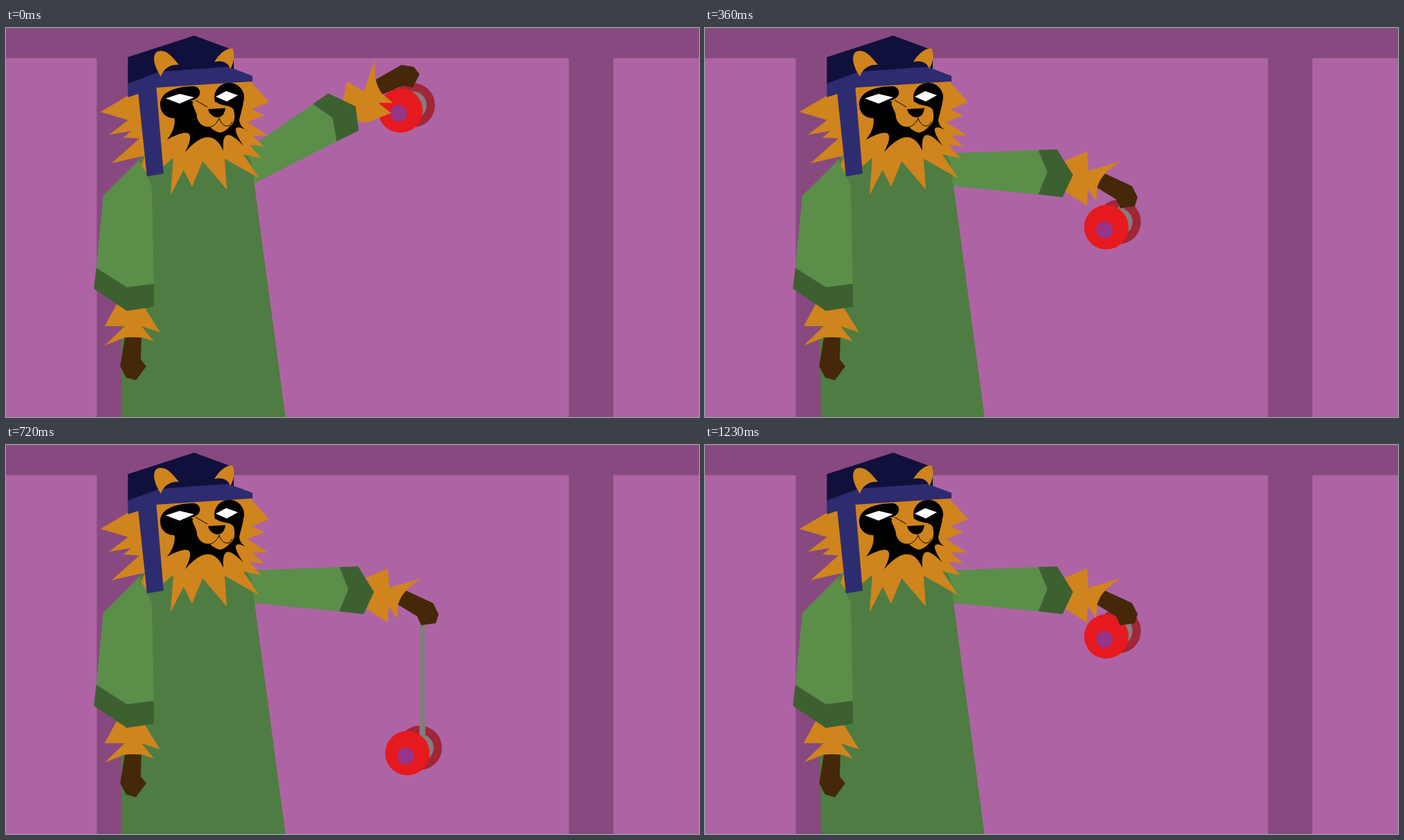
An HTML page with a canvas that plays this animation: 998 px wide and 561 px high, repeating every 1.5 s.

```html
<!DOCTYPE html>
<html lang="en">
<head>
<meta charset="utf-8">
<title>Yo-yo</title>
<style>
  html, body { margin: 0; width: 100%; height: 100%; overflow: hidden; background: #ae64a4; }
  canvas { display: block; }
</style>
</head>
<body>
<canvas id="stage" width="998" height="561"></canvas>
<script>
const ctx = document.getElementById('stage').getContext('2d');
const LOOP = 1500, STEP = 30;
const SWING_END = 240, BOTTOM = 580, PULL = 640, CAUGHT = 1230;
const DEG = Math.PI / 180;

const C = {
  wall: '#ae64a4', frame: '#87497f', coat: '#4f7c42', sleeve: '#5a8e49', cuff: '#3d6030',
  fur: '#d0841d', glove: '#442809', cap: '#10103c', brim: '#2d2c70',
  red: '#e6191e', darkRed: '#a02638', hub: '#95348a', cord: '#857c82'
};

const mix = (a, b, u) => a + (b - a) * u;
const clamp = u => Math.min(Math.max(u, 0), 1);
const progress = (t, from, to) => clamp((t - from) / (to - from));
const smooth = u => u * u * (3 - 2 * u);
const growth = (u, k) => Math.expm1(k * u) / Math.expm1(k);

function fill(color, d) {
  ctx.fillStyle = color;
  ctx.fill(new Path2D(d));
}

function rect(color, x, y, w, h) {
  ctx.fillStyle = color;
  ctx.fillRect(x, y, w, h);
}

function oval(color, x, y, rx, ry = rx) {
  ctx.fillStyle = color;
  ctx.beginPath();
  ctx.ellipse(x, y, rx, ry, 0, 0, Math.PI * 2);
  ctx.fill();
}

function turn(x, y, degrees) {
  ctx.translate(x, y);
  ctx.rotate(degrees * DEG);
  ctx.translate(-x, -y);
}

// Midpoint of two tips, drawn towards a centre
function between([ax, ay], [bx, by], [cx, cy], pull) {
  return [mix((ax + bx) / 2, cx, pull), mix((ay + by) / 2, cy, pull)];
}

// Pointed tuft: wider gaps between tips get deeper notches
function spikes(tips, centre) {
  return tips.map((tip, i) => {
    if (!i) return 'L' + tip;
    const prev = tips[i - 1];
    const gap = Math.hypot(tip[0] - prev[0], tip[1] - prev[1]);
    return 'L' + between(prev, tip, centre, .1 + gap * .005) + 'L' + tip;
  }).join('');
}

// Tips joined by inward curves
function scallops(tips, centre) {
  return tips.slice(1).map((tip, i) => 'Q' + between(tips[i], tip, centre, .65) + ' ' + tip).join('');
}

function drawRoom() {
  rect(C.wall, 0, 0, 998, 561);
  rect(C.frame, 0, 0, 998, 43.5);
  for (const x of [130.7, 810.7]) rect(C.frame, x, 43, 64, 518);
}

function yoyoHeight(t) {
  if (t < SWING_END) return mix(119, 270, t / SWING_END);
  if (t < PULL) return mix(270, 448, smooth(progress(t, SWING_END, BOTTOM) ** 1.58));
  return mix(448, 276, growth(progress(t, PULL, CAUGHT), 3.35));
}

function drawYoyo(t) {
  const x = mix(568, 578, progress(t, 0, SWING_END)), y = yoyoHeight(t);
  const backX = x + 17.8, backY = y - 7.7;
  oval(C.darkRed, backX, backY, 32);
  oval(C.cord, backX, backY, 20);
  if (t >= SWING_END) rect(C.cord, 595.5, 250, 8.3, Math.max(0, backY - 250));
  oval(C.red, x, y, 32);
  oval(C.hub, x - 2.7, y + 4, 12);
}

function drawArm(t) {
  const raised = 1 - progress(t, 0, SWING_END);
  ctx.save();
  turn(347, 208, -32.5 * raised);
  ctx.save();
  turn(537, 205, -22 * raised);
  fill(C.glove, 'M574 209L615 228L623 244L619 257L598 260L592 247L564 230Z');
  fill(C.fur, 'M505 200L519 191L550 178L552 206L599 192Q570 210 565 229L563 250L551 232L550 256L517 235Z');
  ctx.restore();
  fill(C.sleeve, 'M345 181L480 176L493 208L480 240L347 227Z');
  fill(C.cuff, 'M480 176L507 175L530 212L515 244L480 240L493 208Z');
  ctx.restore();
}

function drawBody() {
  fill(C.coat, 'M190 190L220 170H340L353 193L358 228L402.5 561H167L165.5 450Z');
  fill(C.fur, 'M160 397L142 430H171L142 458L172 446H195L213 452L195 430L222 439L199 402Z');
  fill(C.glove, 'M171 447Q183 445 195 447L194 478L202 488L187 508L173 504L164.5 488Z');
  fill(C.sleeve, 'M192 190L140 242L130 346L174 374L213 369L210 228Z');
  fill(C.cuff, 'M130 346L174 374L213 369V402L174 408L126.5 376Z');
}

function drawMane() {
  const centre = [265, 120];
  const left = [[136, 121], [148, 154], [169, 158], [152, 195]];
  const right = [[237, 241], [268, 229], [318, 233], [365, 217], [368, 188],
    [372, 171], [377, 155], [372, 126], [379, 107]];
  fill(C.fur, 'M180 95' + spikes(left, centre) + 'L200 184L195 198L205 214L226 200L241 187' +
    spikes(right, centre) + 'L350 75H230Z');
}

function drawCap() {
  fill(C.cap, 'M175.5 42L271 11L328 32V60L220 68L175.5 82Z');
  fill(C.brim, 'M175.5 80L222 63L320 56L355 69V77L216.5 86L227 210L203 214L190.5 95L175.5 100Z');
  fill(C.fur, 'M223 70C211 52 209 33 223 33C234 33 241 44 249 53C237 52 227 58 223 70Z');
  fill(C.fur, 'M300 49C307 37 319 27 327 30C330 40 328 51 323 59C320 49 310 46 300 49Z');
}

function drawFace() {
  const beard = [[232, 161], [258, 179], [313, 177], [342, 170], [350, 149]];
  fill('#000', 'M222 110C222 92 245 84 271 84C282 86 282 100 271 103L262 125L242 130C230 130 222 122 222 110Z');
  oval('#000', 321.5, 100, 21.5, 21);
  fill('#000', 'M245 105L242 128Q246 143 232 161' + scallops(beard, [300, 115]) +
    'Q336 143 336 132L342 108L328 118L275 125L266 104Z');
  fill(C.fur, 'M266 104C275 110 274 119 275 129Q279 143 294 143Q300 149 308 151Q317 149 322 142' +
    'C330 137 330 129 328 118C323 110 309 113 303 107Z');
  fill('#fff', 'M230 101.5L250 95L271 100L250 109ZM302 99L317 91L334 97L318 106Z');
  fill('#000', 'M291 117L316 115.5Q314 129 304 129Q293 127 291 117Z');
  ctx.strokeStyle = '#000';
  ctx.lineWidth = 1;
  ctx.stroke(new Path2D('M273 104L290 114M282 141C292 146 302 142 307 130C311 143 322 145 326 135'));
}

function render(now) {
  const t = Math.min(Math.floor((now % LOOP) / STEP) * STEP, CAUGHT);
  drawRoom();
  drawYoyo(t);
  drawArm(t);
  drawBody();
  drawMane();
  drawCap();
  drawFace();
}

let start;
function tick(now) {
  start ??= now;
  render(now - start);
  requestAnimationFrame(tick);
}
render(0);
requestAnimationFrame(tick);
</script>
</body>
</html>
```
